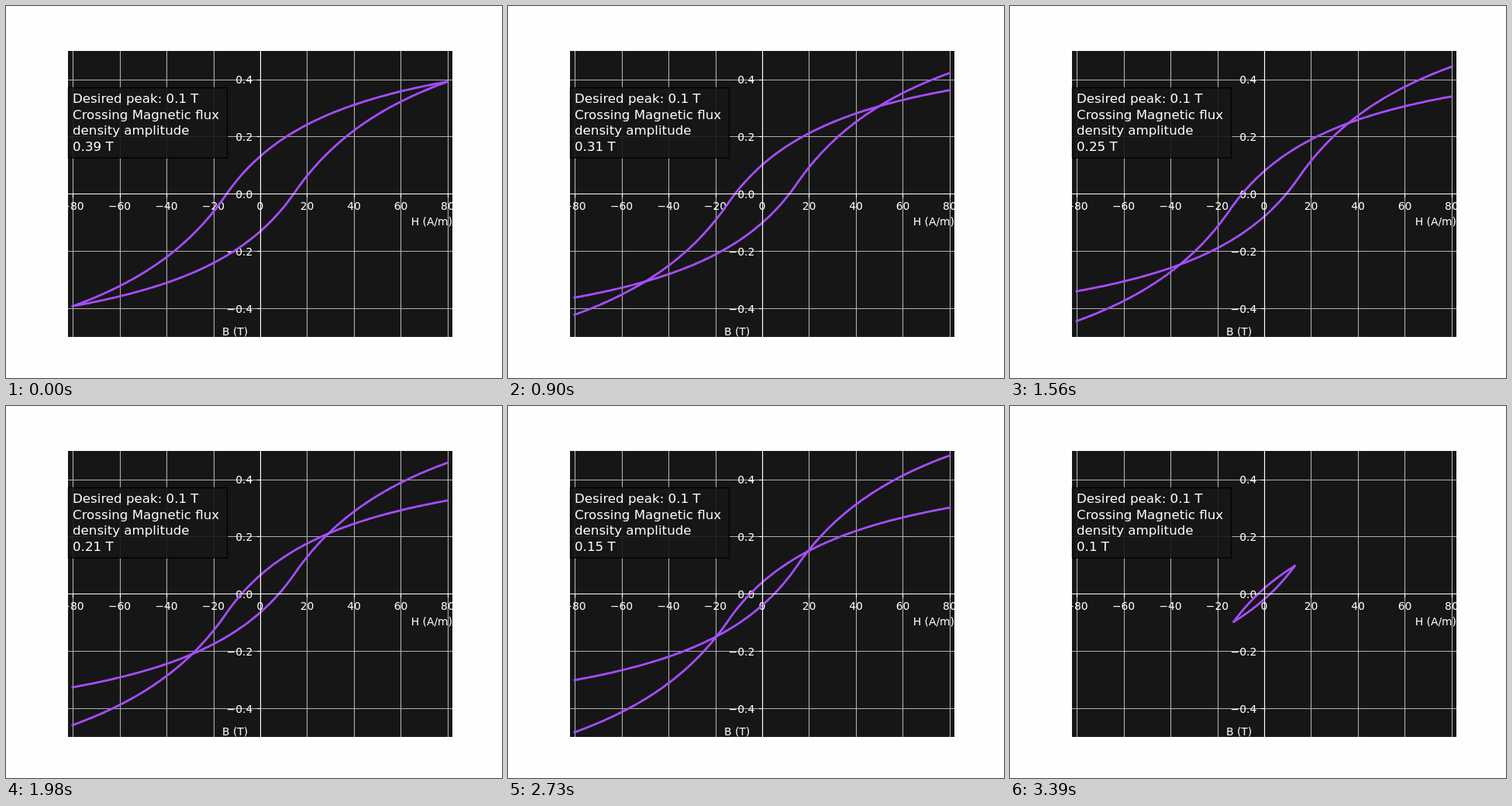
Write an HTML page that moves like this. It is 640x480 px and loops after 6690 ms.

```html
<!DOCTYPE html>
<html lang="en">
<head>
<meta charset="utf-8">
<title>Hysteresis loop</title>
<style>
  html, body { margin: 0; width: 100%; height: 100%; overflow: hidden; background: #fefefe; }
  svg { display: block; width: 640px; height: 480px; }
  text { font: 13.89px "DejaVu Sans", sans-serif; fill: #fff; white-space: pre; }
  .note text { font-size: 16.67px; }
  .note rect { fill: #161616; stroke: #000; stroke-width: 1.39; opacity: .9; }
  .grid { stroke: #b0b0b0; stroke-width: 1.11; }
  .axis { stroke: #fff; stroke-width: 1.11; }
  .curve { fill: none; stroke: #a64dff; stroke-width: 2.78; stroke-linecap: square; stroke-linejoin: round; }
</style>
</head>
<body>
<svg viewBox="0 0 640 480">
  <clipPath id="plot"><rect x="80" y="57.6" width="496" height="369.6"/></clipPath>
  <rect x="80" y="58" width="496" height="369" fill="#161616"/>
  <g id="ticks"></g>
  <text x="576" y="283" text-anchor="end">H (A/m)</text>
  <text x="279" y="425">B (T)</text>
  <g clip-path="url(#plot)">
    <path class="curve" id="upper"/>
    <path class="curve" id="lower"/>
  </g>
  <path class="axis" d="M328.5 58V427M80 242.5H576"/>
  <g class="note">
    <rect x="80.5" y="105.5" width="205" height="90.5"/>
    <text x="86" y="125">Desired peak: 0.1 T</text>
    <text x="86" y="145.7">Crossing Magnetic flux</text>
    <text x="86" y="166.3">density amplitude</text>
    <text x="86" y="187" id="value"></text>
  </g>
</svg>
<script>
const STEP = 30, LOOP = 6690, LAST = 113, H_MAX = 80, COERCIVE = 14.3;
const $ = id => document.getElementById(id);
const px = h => 328 + h * 496 / 164;
const py = b => 242.4 - b * 369.6;
const snap = v => Math.floor(v + 0.5) + 0.5;

function add(name, attrs, text = "") {
  const el = document.createElementNS("http://www.w3.org/2000/svg", name);
  for (const key in attrs) el.setAttribute(key, attrs[key]);
  el.textContent = text;
  $("ticks").append(el);
}
const minus = s => s.replace("-", "\u2212");

for (let h = -80; h <= 80; h += 20) {
  const x = snap(px(h));
  add("path", { class: "grid", d: `M${x} 58V427` });
  add("path", { class: "axis", d: `M${x} 242.5v4.86` });
  add("text", { x: px(h), y: 263, "text-anchor": "middle" }, minus(String(h)));
}
for (let i = -2; i <= 2; i++) {
  const b = i / 5, y = snap(py(b));
  add("path", { class: "grid", d: `M80 ${y}H576` });
  add("path", { class: "axis", d: `M328.5 ${y}h-4.86` });
  add("text", { x: 318.3, y: Math.round(py(b) + 5.28), "text-anchor": "end" }, minus(b.toFixed(1)));
}

// Saturating branches, mirrored through the origin
function lower(h) {
  const u = h - COERCIVE;
  return u > 0 ? u / (83.3 + 1.283 * u) : u / (85.6 - 1.643 * u);
}
const upper = h => -lower(-h);

function crossing(shift) {
  let a = 0, b = H_MAX;
  for (let i = 0; i < 40; i++) {
    const m = (a + b) / 2;
    if (upper(m) - lower(m) > 2 * shift) a = m; else b = m;
  }
  return a;
}

function trace(branch, shift, limit) {
  const n = 160, pts = [];
  for (let i = 0; i <= n; i++) {
    const h = limit * (2 * i / n - 1);
    pts.push(px(h).toFixed(2) + " " + py(branch(h) + shift).toFixed(2));
  }
  return "M" + pts.join("L");
}

let shown = -1;
function draw(step) {
  if (step === shown) return;
  shown = step;
  const shift = Math.min(step, LAST - 1) / 1000;
  const meet = crossing(shift);
  const limit = step === LAST ? meet : H_MAX;
  $("upper").setAttribute("d", trace(upper, -shift, limit));
  $("lower").setAttribute("d", trace(lower, shift, limit));
  $("value").textContent = Number((upper(meet) - shift).toFixed(2)) + " T";
}

const start = performance.now();
function tick() {
  const t = (performance.now() - start) % LOOP;
  draw(Math.min(LAST, Math.floor(t / STEP)));
  requestAnimationFrame(tick);
}
tick();
</script>
</body>
</html>
```
